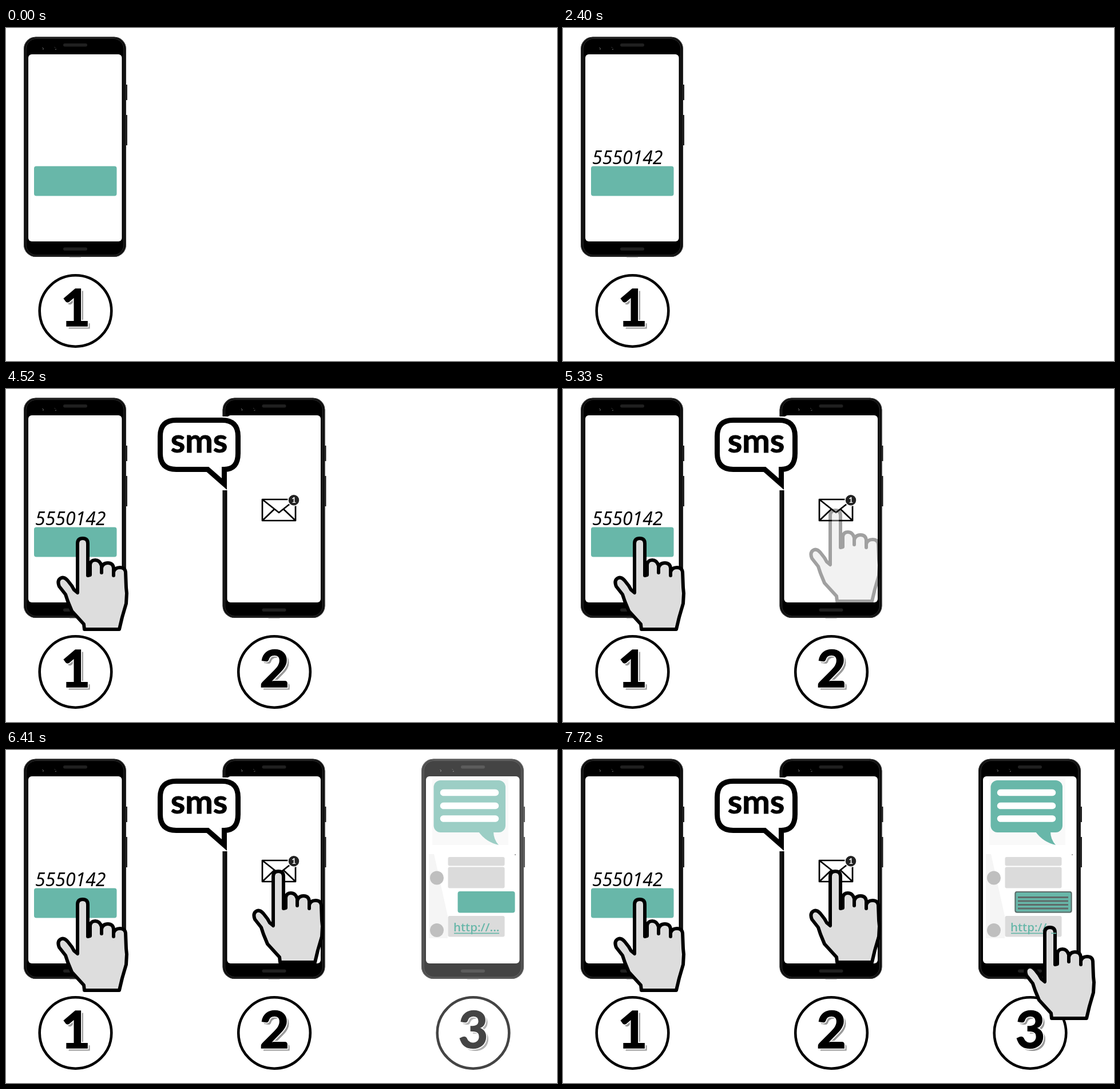
Recreate the animation shown at these times as an HTML page. Size 963 by 582 pixels, loop 8.12 s.

```html
<!DOCTYPE html>
<html lang="en">
<head>
<meta charset="utf-8">
<title>Three steps by SMS</title>
<style>
  html, body { margin: 0; width: 100%; height: 100%; overflow: hidden; background: #fff; }
  svg { display: block; width: 963px; height: 582px; }
  .teal { fill: #68b7a9; }
  .step text { font: bold 90px Lato, sans-serif; text-anchor: middle; }
  #digits { font: italic 32px "Noto Sans", sans-serif; }
  #sms text { font: bold 58px Lato, "Open Sans", sans-serif; text-anchor: middle; }
  #sms .badge { font: bold 14px Lato, sans-serif; fill: #fff; }
  .link { font: 600 20.5px "Open Sans", sans-serif; }
</style>
</head>
<body>
<svg viewBox="0 0 963 582">
  <defs>
    <g id="phone">
      <path d="M210.5 99v27M210.5 152v53" stroke="#222" stroke-width="3"/>
      <rect x="31" y="15.5" width="179" height="384.5" rx="21"/>
      <rect x="32" y="16.5" width="177" height="382.5" rx="20" fill="none" stroke="#2b2b2b" stroke-width="1.6"/>
      <rect x="35" y="18.5" width="171" height="378.5" rx="18" fill="none" stroke="#444" stroke-width=".8"/>
      <rect x="39" y="46" width="163.5" height="327" rx="6" fill="#fff"/>
      <rect x="100" y="27" width="42" height="5.5" rx="2.7" fill="#202020"/>
      <rect x="100" y="383.5" width="42" height="5.5" rx="2.7" fill="#202020"/>
      <path d="M63.5 34l2 2-1 2M85 33.5l1 1M86 37.5l2-.5" fill="none" stroke="#777"/>
      <path d="M111 400h20" stroke="#555"/>
      <ellipse cx="121.5" cy="494.5" rx="62.8" ry="62.2" fill="#fff" stroke="#000" stroke-width="4.6"/>
    </g>
    <path id="hand" d="M125 356V270Q125 261 134 261T143 270V326L147 325V307Q148 299 156 299T167 309V321V313Q169 304 178 304T188 313V326V320Q190 312 199 312T209 320L210 347 211 357 210 375 203 399 198 420H137L136 411 115 388 108 371 104 359 93 345Q89 335 95 331T108 335L115 344 119 351Z"
      fill="#ddd" stroke="#000" stroke-width="6" stroke-linejoin="round"/>
    <clipPath id="screen2"><rect x="420" y="200" width="140" height="173"/></clipPath>
  </defs>

  <g class="step" data-n="1">
    <use href="#phone"/>
    <rect class="teal" x="49" y="241.5" width="144.5" height="52" rx="4"/>
  </g>
  <text id="digits" x="51" y="238"></text>
  <use id="hand1" href="#hand"/>

  <g id="phone2" class="step" data-n="2" transform="translate(347.5)"><use href="#phone"/></g>
  <g id="sms">
    <path d="M265 48h149v96h-27v33H265z" fill="#fff"/>
    <path d="M297.5 54.5H377.5Q405.5 54.5 405.5 82.5V112.5Q405.5 140.5 381.5 140.5V166L352.5 140.5H297.5Q269.5 140.5 269.5 112.5V82.5Q269.5 54.5 297.5 54.5Z"
      fill="#fff" stroke="#000" stroke-width="9" stroke-miterlimit="8"/>
    <text x="337.5" y="111" stroke="#000">sms</text>
    <path d="M448 193h58v37h-58zl29 23 29-23M448 230l21-20M506 230l-21-20" fill="none" stroke="#000" stroke-width="2.7" stroke-linejoin="round"/>
    <circle cx="503" cy="194.3" r="10" fill="#222" stroke="#fff" stroke-width="1.5"/>
    <text class="badge" x="503" y="199.3">1</text>
  </g>
  <g clip-path="url(#screen2)"><use id="hand2" href="#hand" x="342" y="-49"/></g>

  <g id="phone3" class="step" data-n="3" transform="translate(695)"><use href="#phone"/></g>
  <g id="chat">
    <path d="M745 50h133v116H745z" fill="#f9f9f9"/>
    <path d="M739 182h9l24 108v39h-33z" fill="#f5f5f5"/>
    <g id="bubble">
      <rect class="teal" x="747.5" y="53" width="125.5" height="91" rx="12"/>
      <path class="teal" d="M826 143Q839 161 861 166Q852 156 852 143z"/>
    </g>
    <path d="M764.5 74.5h91M764.5 97.5h91M764.5 120h91" stroke="#fff" stroke-width="11.5" stroke-linecap="round"/>
    <g fill="#dbdbdb">
      <rect x="772.5" y="187" width="99" height="15.5" rx="3"/>
      <rect x="772.5" y="204.5" width="99" height="37" rx="3"/>
      <rect x="772.5" y="290" width="99" height="36.5" rx="3"/>
    </g>
    <g fill="#bfbfbf"><circle cx="753" cy="223.5" r="12"/><circle cx="753" cy="315" r="12"/></g>
    <rect class="teal" x="789.5" y="247" width="100" height="37.5" rx="4"/>
    <circle cx="890" cy="183" r=".7"/>
    <g id="reply" fill="none" stroke="#5f6a69">
      <rect x="790.5" y="248" width="98" height="35.5" rx="3" stroke-width="2"/>
      <path d="M795 257.5h88M795 264h88M795 270.5h88M795 277h88" stroke-width="3"/>
    </g>
    <text class="link teal" x="782" y="317">http://...</text>
    <path d="M783 320.3h79" stroke="#68b7a9" stroke-width="1.8"/>
  </g>
  <g id="hand3">
    <use href="#hand" x="717" y="49"/>
    <path d="M853 320.3h9" stroke="#68b7a9" stroke-width="1.8"/>
  </g>
</svg>
<script>
  const LOOP = 8120, NUMBER = "5550142";
  const byId = id => document.getElementById(id);

  // Big step number: grey shadow, white rim, black face
  for (const step of document.querySelectorAll(".step")) {
    const layer = (shift, paint) =>
      `<text x="${121.5 + shift}" y="${521 + shift}" ${paint}>${step.dataset.n}</text>`;
    step.insertAdjacentHTML("beforeend",
      layer(4, 'fill="#999" stroke="#999"') +
      layer(0, 'fill="#fff" stroke="#fff" stroke-width="5"') +
      layer(0, 'stroke="#000" stroke-width="1.5"'));
  }

  // [time, value] pairs; each value holds until the next time
  const fade = (a, b, c) => [[a, .37], [b, .73], [c, 1]];
  const opacity = {
    hand1: fade(2930, 3200, 3460),
    phone2: [[3730, 1]],
    sms: [[4520, 1]],
    hand2: fade(5330, 5600, 5880),
    phone3: fade(6130, 6410, 6670),
    chat: [[6130, 1]],
    bubble: [[6130, .32], [6410, .64], [6670, 1]],
    reply: [[6670, 1]],
    hand3: fade(7200, 7460, 7720)
  };
  const typed = [[1050, 1], [1310, 2], [1580, 3], [1850, 4], [2120, 6], [2400, 7]];

  const valueAt = (steps, t) => steps.reduce((v, [at, next]) => t >= at ? next : v, 0);

  function draw(now) {
    const t = now % LOOP;
    byId("digits").textContent = NUMBER.slice(0, valueAt(typed, t));
    for (const id in opacity) byId(id).setAttribute("opacity", valueAt(opacity[id], t));
  }

  const start = performance.now();
  function tick() {
    draw(performance.now() - start);
    requestAnimationFrame(tick);
  }
  tick();
</script>
</body>
</html>
```
